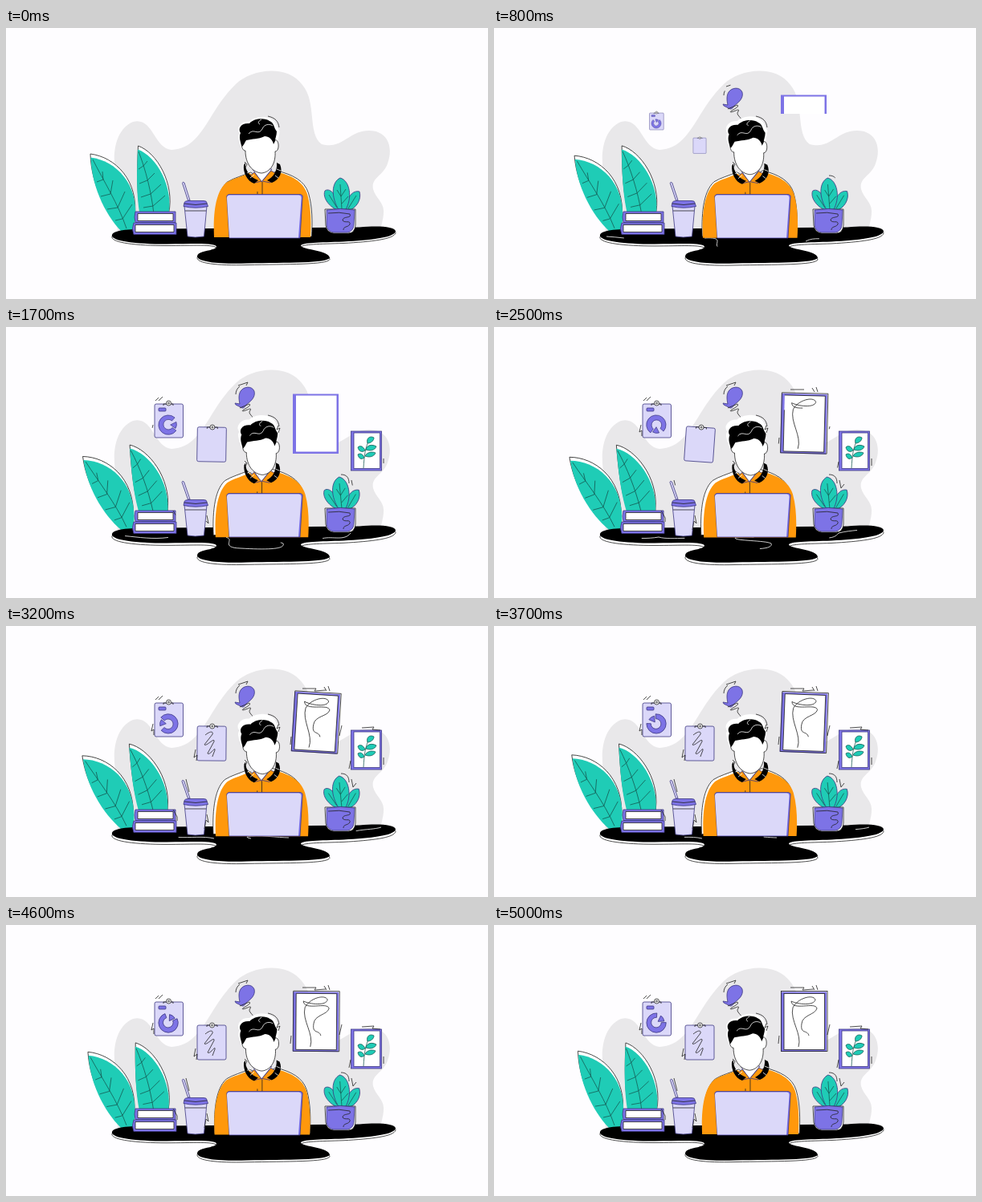
Recreate the animation shown at these times as an HTML page. Size 600x338 px, loop 5.1 s.

```html
<!DOCTYPE html>
<html lang="en">
<head>
<meta charset="utf-8">
<title>At the desk</title>
<style>
  html, body { margin: 0; width: 100%; height: 100%; overflow: hidden; background: #fefdff; }
  svg { display: block; width: 600px; height: 338px; }
  .ink { fill: none; stroke: #222; stroke-width: .8; }
  .out { fill: #fff; stroke: #222; stroke-width: .8; }
  .thin { fill: none; stroke: #14564f; stroke-width: .75; }
  .white { fill: none; stroke: #fff; stroke-width: .8; }
  .teal { fill: #1fccb6; }
  .purple { fill: #7d73e6; }
  .pale { fill: #dbd8f9; }
  .orange { fill: #ff980c; }
  .edge { stroke: #3d3880; stroke-width: .8; }
</style>
</head>
<body>
<svg viewBox="0 0 600 338">
  <defs>
    <clipPath id="wipe1"><rect id="wipeA" x="340" y="70" width="90" height="0"/></clipPath>
    <clipPath id="wipe2"><rect id="wipeB" x="420" y="122" width="60" height="0"/></clipPath>
    <path id="leafA" d="M105 159C136 163 166 192 160 239L157 253H145C127 236 106 199 105 159Z"/>
    <path id="leafB" d="M164 149C187 157 210 196 202 233L200 246H170C161 212 163 176 164 149Z"/>
    <path id="table" d="M132 257.500C134 250 165 250 190 250L440 248C463 246 484 247 485 253C483 261 455 264 420 266C390 267 368 267 367 271C369 276 402 277 403 286C400 293 350 292 300 293C262 294 238 291 238 284C239 276 261 278 262 272C260 267 232 269 200 269C160 269 130 265 132 257.500Z"/>
    <path id="torso" d="M259 261C258 238 259 206 274 193C282 188 294 185 303 181L318 190L336 179C355 184 370 191 375 207C380 224 380 244 379 261Z"/>
    <path id="hair" d="M294 148C291 141 290 135 292 131C288 125 293 118 303 119C309 112 323 112 328 116C334 118 333 124 337 129C337 134 335 137 335 141L333 145C332 139 327 135 322 135C314 139 307 138 299 140C297 143 296 146 294 148Z"/>
  </defs>

  <path fill="#e9e8ea" d="M139 255C136 228 143 212 139 193C131 165 133 128 158 117C183 110 184 150 206 152C245 150 250 105 286 70C306 51 350 45 369 71C387 92 375 132 393 145C419 152 426 128 452 128C474 128 483 147 475 169C470 184 454 187 457 201C460 212 471 218 470 230C470 238 467 245 466 255Z"/>

  <g id="balloon">
    <path class="purple edge" d="M286 97L285 95L291 96C290 91 289 85 292 80C296 74 306 73 309 80C311 88 304 93 299 97C297 101 294 102 292 100Z"/>
    <path class="ink" data-draw="300,400" d="M291 101L303 96C307 99 291 104 295 105C302 103 306 100 304 104C301 108 306 110 308 114"/>
  </g>
  <path class="ink" data-draw="700,500" d="M286 84C286 80 288 76 291 74M289 73L301 69L299 73"/>

  <g id="board">
    <rect class="pale edge" x="185" y="96" width="35.500" height="42" rx="2"/>
    <path class="ink" d="M196 98V96H208V98"/>
    <circle class="out" cx="202.500" cy="95" r="3"/><circle class="ink" cx="202.500" cy="95" r="1"/>
    <rect class="purple edge" x="190" y="101" width="9" height="4" rx="1"/>
    <g id="donut">
      <path class="purple edge" d="M11 8A13.500 13.500 0 1 1 9 -10L5 -5.500A7 7 0 1 0 5.700 4Z"/>
      <path class="purple edge" d="M3 0L11 -4A11 11 0 0 1 10 5Z"/>
    </g>
  </g>
  <g class="ink">
    <path data-draw="1400,300" d="M186 92L190 88M190 92L195 87"/>
    <path data-draw="1600,500" d="M183 122L181 131L184 129V136"/>
  </g>

  <g id="note">
    <rect class="pale edge" x="238" y="125" width="36" height="43" rx="2"/>
    <path class="ink" d="M250 127V125H263V127"/>
    <circle class="out" cx="256.500" cy="125" r="3"/><circle class="ink" cx="256.500" cy="125" r="1"/>
    <path class="ink" data-draw="2600,600" d="M248 136C254 131 258 131 257 135L247 148C249 151 260 138 259 144L251 159C254 162 261 149 260 155L257 163"/>
  </g>
  <path class="ink" data-draw="2600,500" d="M236 154L234 164L238 161L237 168"/>

  <g clip-path="url(#wipe1)">
    <g id="picture">
      <rect class="purple" x="357" y="83.500" width="57" height="74.500"/>
      <rect fill="#fff" x="361" y="85.500" width="50.500" height="70"/>
      <rect class="ink" data-draw="1800,650" x="357.500" y="82.500" width="57.500" height="75"/>
      <rect class="ink" data-draw="1900,650" x="361" y="85.500" width="50.500" height="70"/>
      <path class="ink" data-draw="1900,900" d="M379 152C384 136 368 119 372 103C378 91 397 86 400 93C399 101 378 99 370 95C371 108 400 95 402 104C400 112 384 112 383 123C381 137 390 130 392 138"/>
    </g>
  </g>
  <g class="ink">
    <path data-draw="2200,300" d="M369 78H386"/>
    <path data-draw="2700,400" d="M386 78L384 81L398 80"/>
    <path data-draw="2300,300" d="M396 76L399 81M401 75L403 81"/>
    <path data-draw="2200,400" d="M355 138L354 148"/>
    <path data-draw="2400,400" d="M418 124L415 137"/>
  </g>

  <g clip-path="url(#wipe2)">
    <rect class="purple edge" x="429.500" y="130" width="38" height="49"/>
    <rect class="edge" fill="#fff" x="433" y="132" width="32.500" height="44.500"/>
    <path class="thin" d="M445 176C446 160 447 150 453 139"/>
    <g class="teal thin" style="fill:#1fccb6">
      <path d="M450 145C448 139 453 135 458 138C458 142 454 145 450 145Z"/>
      <path d="M448 153C449 147 456 146 461 149C459 154 453 155 448 153Z"/>
      <path d="M447 161C449 156 456 155 460 157C458 162 452 163 447 161Z"/>
      <path d="M447 154C445 149 441 147 438 150C439 155 443 157 447 154Z"/>
      <path d="M446 163C444 158 441 157 438 159C439 164 442 166 446 163Z"/>
    </g>
  </g>
  <g class="ink">
    <path data-draw="1500,300" d="M470 164V173"/>
    <path data-draw="2700,400" d="M443 127L458 126L456 129L466 130"/>
    <path data-draw="2200,400" d="M429 168L427 178"/>
  </g>

  <g id="left1">
    <use href="#leafA" class="out" y="-2"/>
    <use href="#leafA" class="teal" x=".5" y="2.500"/>
    <path class="thin" d="M108 164C121 190 140 220 150 250M121 189L120 179M121 189L113 192M130 207L133 190M130 207L118 210M139 224L148 204M139 224L126 226M145 238L157 220M145 238L136 240"/>
  </g>
  <g id="left2">
    <use href="#leafB" class="out" x=".5" y="-2"/>
    <use href="#leafB" class="teal" y="2.500"/>
    <path class="thin" d="M165 154C174 177 181 205 184 232M171 172L176 166M171 172L165 176M176 190L185 181M176 190L166 194M180 207L193 195M180 207L168 211M183 222L198 209M183 222L171 224"/>
  </g>

  <use id="tableLine" href="#table" class="out"/>
  <use href="#table" y=".5"/>

  <g class="white">
    <path data-run="500,3400" d="M262 262C296 260 260 275 292 276C327 278 348 277 345 270C338 266 300 267 300 263C312 260 340 264 352 264"/>
    <path data-run="200,4100" d="M388 266C402 258 420 269 429 257C445 253 458 254 467 251"/>
    <path data-run="300,3900" d="M140 260C160 261 182 266 205 262C219 266 243 261 259 265"/>
  </g>

  <g>
    <path class="purple edge" d="M159 243H212V257.500H159Q156 250 159 243Z"/>
    <path class="out" d="M161 245.500H209V254.500H161Z"/>
    <path class="purple edge" d="M161 229H211V242.500H161Q159 236 161 229Z"/>
    <path class="out" d="M164 231.500H208V240.500H164Z"/>
    <path class="ink" data-draw="1500,500" d="M208 229L213 238V243"/>
  </g>

  <g>
    <path class="pale edge" d="M222 222H250L246.500 260Q235 262 226 260Z"/>
    <path class="pale edge" id="straw" d="M219.500 193.500Q220 191 222 193L229 215H226.500Z"/>
    <path class="purple edge" d="M221 222.500L222 217.500Q223 215.500 227 215.500H246Q250 215.500 250 218L251.500 222.500Q236 226 221 222.500Z"/>
    <path class="ink" d="M222 219Q236 222 250 219M223 228H249"/>
    <path class="ink" data-draw="1300,700" d="M250 235L252 245L249 242L247 253"/>
    <path class="ink" data-draw="2300,500" d="M224 191L228 207"/>
  </g>

  <g>
    <g id="plant">
      <g class="teal edge">
        <path d="M414 228C400 222 394 210 397 203C404 198 414 211 415 228Z"/>
        <path d="M422 228C424 210 432 202 440 204C443 214 436 225 426 228Z"/>
        <path d="M415 228C404 211 405 192 416 187C428 190 432 212 422 228Z"/>
      </g>
      <path class="thin" d="M416 195L418 226M417 210L412 202M417 210L423 201M418 219L426 210M402 208L412 224M436 209L426 225"/>
    </g>
    <path class="ink" data-draw="500,600" d="M417 184C425 184 427 189 427 195"/>
    <path class="ink" data-draw="1500,500" d="M430 191L432 201L436 196"/>
    <path class="out" d="M397 226H435V246Q434 256 426 256H408Q399 255 398 246Z"/>
    <path class="purple edge" d="M399 227Q416 224 434 227L433 246Q432 254 425 255H408Q400 254 399 246Z"/>
    <path class="ink" d="M401 231Q415 229 428 232C431 238 419 234 419 240C422 244 429 239 428 245C425 249 420 247 420 252"/>
  </g>

  <g id="body">
    <use id="bodyLine" href="#torso" class="out"/>
    <use href="#torso" class="orange"/>
    <path class="ink" d="M319 192V208M313 204V207"/>
    <path fill="#fff" class="edge" d="M307 176L318 192L331 176Z"/>
    <path class="orange edge" d="M303 185L309 180L318 191L310 193ZM337 182L330 178L319 191L329 193Z"/>
    <path d="M298 168C297 178 305 187 314 190L309 194C300 191 295 180 296 171ZM337 168C338 178 333 186 325 190L331 193C341 189 345 179 341 170Z"/>
    <path class="white" d="M300 181L305 178M304 187L309 183M335 184L339 187M337 176L342 178"/>
  </g>
  <g id="head">
    <use id="halo" href="#hair" fill="#fff" stroke="#fff" stroke-width="5"/>
    <path class="out" d="M296 139C291 139 293 154 298 153C298 170 307 180 318 181C329 180 336 169 335 154C341 154 340 138 335 140C330 128 302 128 296 139Z"/>
    <use href="#hair"/>
    <path class="white" d="M302 132C308 124 314 135 319 126C321 120 328 119 332 122M318 114C314 116 313 119 316 120"/>
  </g>
  <path class="ink" d="M326 110C335 112 339 116 340 124"/>
  <path class="ink" data-draw="1400,300" d="M339 123L337 128L341 126L339 132"/>
  <path class="ink" d="M297 167L300 170L298 174"/>

  <path class="purple edge" d="M278 207.500H366Q370 208 369 212L366 262H278L275 212Q274 208 278 207.500Z"/>
  <path class="pale" d="M278 208.500H364.500Q368 209 367.500 213L364 261.500H278L275 213Q274.500 209 278 208.500Z"/>
</svg>

<script>
const LOOP = 5100, STEP = 100;
const $ = id => document.getElementById(id);
const clamp = x => Math.max(0, Math.min(1, x));
const phase = (t, start, length) => clamp((t - start) / length);
const smooth = x => x * x * (3 - 2 * x);
const set = (id, value) => $(id).setAttribute('transform', value);
const turn = (id, angle, x, y) => set(id, `rotate(${angle} ${x} ${y})`);

// Linear interpolation through [time, value] pairs
function along(keys, t) {
  if (t <= keys[0][0]) return keys[0][1];
  for (let i = 1; i < keys.length; i++) {
    const [t0, a] = keys[i - 1], [t1, b] = keys[i];
    if (t <= t1) return a + (b - a) * (t - t0) / (t1 - t0);
  }
  return keys[keys.length - 1][1];
}

function grow(id, scale, x, y, angle = 0) {
  $(id).style.display = scale ? '' : 'none';
  set(id, `translate(${x} ${y}) rotate(${angle}) scale(${scale}) translate(${-x} ${-y})`);
}

const collect = name => [...document.querySelectorAll(`[data-${name}]`)].map(el => {
  el.setAttribute('pathLength', 1);
  const [start, length] = el.dataset[name].split(',').map(Number);
  return { el, start, length };
});
const strokes = collect('draw');
const runners = collect('run');

const donutTurn = [[500, -110], [1700, 0], [2500, 90], [3200, 185], [4200, 275], [5000, 322]];
const pictureTilt = [[1800, 0], [2500, 1.4], [3200, 3.5], [4200, .8], [5000, 0]];
const noteTilt = [[1300, 0], [1700, 1], [2500, 4], [3200, .5], [4200, 0]];

function draw(t) {
  const sway = Math.sin(Math.PI * t / LOOP) ** 1.1;

  turn('left1', -7 * sway, 143, 250);
  turn('left2', -7.5 * sway, 160, 240);
  turn('plant', -2 * sway, 418, 228);
  turn('straw', -1.5 * sway, 227, 214);
  set('tableLine', `translate(0 ${2.5 + sway})`);
  set('body', `translate(${318 - sway * .5} ${sway * 1.5}) scale(${1 - .045 * sway} 1) translate(-318 0)`);
  set('bodyLine', `translate(${1.5 - 5 * sway} ${-1 - 2 * sway})`);
  set('head', `translate(${1.5 * sway} ${4 * sway})`);
  set('halo', `translate(${1 - 2 * sway} ${-5 * sway})`);

  grow('balloon', smooth(phase(t, 100, 600)), 294, 99);
  grow('board', smooth(phase(t, 500, 600)), 202, 116);
  grow('note', smooth(phase(t, 520, 600)), 256, 147, along(noteTilt, t));
  set('donut', `translate(202 122) rotate(${along(donutTurn, t)}) scale(.9)`);
  turn('picture', along(pictureTilt, t), 385.5, 120);

  const a = smooth(phase(t, 600, 550));
  $('wipeA').setAttribute('height', a && 13 + 80 * a);
  const b = smooth(phase(t, 1200, 500));
  $('wipeB').setAttribute('height', b && 6 + 56 * b);

  for (const { el, start, length } of strokes) {
    const p = phase(t, start, length);
    el.style.visibility = p ? 'visible' : 'hidden';
    el.style.strokeDasharray = p < 1 ? `${p} 2` : 'none';
  }
  for (const { el, start, length } of runners) {
    const p = phase(t, start, length);
    el.style.visibility = p > 0 && p < 1 ? 'visible' : 'hidden';
    el.style.strokeDasharray = '.45 3';
    el.style.strokeDashoffset = .45 - 1.45 * p;
  }
}

const origin = performance.now();
function tick() {
  const t = (performance.now() - origin) % LOOP;
  draw(Math.floor(t / STEP) * STEP);
  requestAnimationFrame(tick);
}
tick();
</script>
</body>
</html>
```
